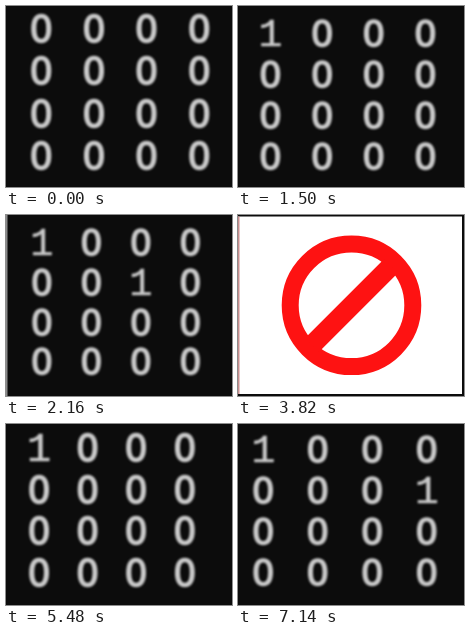
Write an HTML page that moves like this. It is 226 px wide and 181 px high and loops after 8000 ms.

```html
<!DOCTYPE html>
<html lang="en">
<head>
<meta charset="utf-8">
<title>Bit matrix</title>
<style>
html, body { margin: 0; width: 100%; height: 100%; overflow: hidden; background: #0c0c0c; }
svg { display: block; width: 100%; height: 100%; }
text { fill: #cacaca; stroke: #cacaca; text-anchor: middle; filter: blur(.8px); }
.zero { font-family: "DejaVu Sans", sans-serif; stroke-width: 1.5px; }
.one { font-family: "Liberation Mono", monospace; stroke-width: .6px; }
</style>
</head>
<body>
<svg id="stage" viewBox="0 0 226 181"></svg>
<script>
const LOOP = 8000;
const stage = document.getElementById('stage');

// x, y: centre of the first digit; dx, dy: pitch; ones: [column, row]
const scenes = [
  { at: 0, x: 35.2, y: 22.5, dx: 52.7, dy: 42.6, size: 37, ones: [] },
  { at: 500, x: 32.4, y: 26.8, dx: 51.7, dy: 41, size: 36, ones: [[0, 0]] },
  { at: 2160, x: 35.8, y: 28, dx: 49.5, dy: 39.6, size: 35, ones: [[0, 0], [2, 1]], edge: '#8c8c8c' },
  { at: 3820, sign: true },
  { at: 5480, x: 33, y: 24.5, dx: 48.6, dy: 41.5, size: 36.5, ones: [[0, 0]] },
  { at: 7140, x: 25.3, y: 25.2, dx: 54.5, dy: 40.9, size: 36, ones: [[0, 0], [3, 1]] }
];

function add(parent, tag, attrs, text = '') {
  const el = document.createElementNS('http://www.w3.org/2000/svg', tag);
  for (const key in attrs) el.setAttribute(key, attrs[key]);
  el.textContent = text;
  return parent.appendChild(el);
}

function drawMatrix(group, s) {
  for (let row = 0; row < 4; row++) {
    for (let col = 0; col < 4; col++) {
      const one = s.ones.some(([c, r]) => c === col && r === row);
      add(group, 'text', {
        class: one ? 'one' : 'zero',
        x: s.x + col * s.dx,
        y: s.y + row * s.dy + s.size * 0.355,
        'font-size': s.size * (one ? 1.1 : 1)
      }, one ? '1' : '0');
    }
  }
  if (s.edge) add(group, 'rect', { width: 1.5, height: 181, fill: s.edge });
}

function drawSign(group) {
  add(group, 'rect', { y: 1.5, width: 224, height: 177.5, fill: '#fff' });
  add(group, 'rect', { y: 1.5, width: 1.5, height: 177.5, fill: '#c98f8f' });
  const red = { fill: 'none', stroke: '#fe1212' };
  add(group, 'circle', { ...red, cx: 113.5, cy: 90.3, r: 61.3, 'stroke-width': 17 });
  add(group, 'path', { ...red, d: 'M153 51 74 130', 'stroke-width': 19.5 });
}

const groups = scenes.map(s => {
  const group = add(stage, 'g', {});
  add(group, 'rect', { width: 226, height: 181, fill: '#0c0c0c' });
  (s.sign ? drawSign : drawMatrix)(group, s);
  return group;
});

function render(now) {
  const t = now % LOOP;
  const current = scenes.filter(s => s.at <= t).length - 1;
  groups.forEach((g, i) => g.style.display = i === current ? '' : 'none');
}

const start = performance.now();
function tick() {
  render(performance.now() - start);
  requestAnimationFrame(tick);
}
tick();
</script>
</body>
</html>
```
